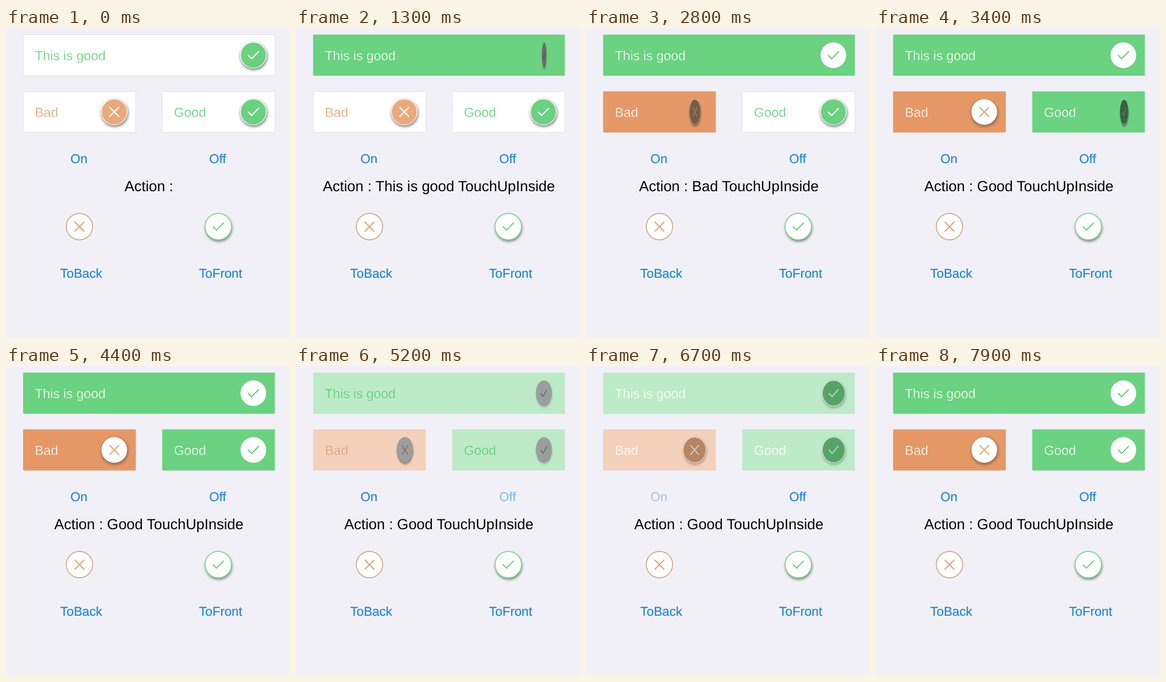
An HTML page for the animation above (8 s loop, 487x530 px).

```html
<!DOCTYPE html>
<html lang="en">
<head>
<meta charset="utf-8">
<title>Flip switches</title>
<style>
html, body { margin: 0; width: 100%; height: 100%; overflow: hidden; background: #f2f0f7; }
svg { display: block; width: 100%; height: 100%; }
text { font-family: "Liberation Sans", Arial, sans-serif; text-rendering: geometricPrecision; }
.mark { fill: none; stroke-width: 2.1; }
.title { font-size: 22.5px; stroke-width: .45px; }
.link { font-size: 21.9px; fill: #1c85d8; stroke: #1c85d8; stroke-width: .2px; text-anchor: middle; }
.action { font-size: 25.1px; fill: #050505; text-anchor: middle; }
</style>
</head>
<body>
<svg id="stage" viewBox="0 0 487 530">
  <defs>
    <filter id="blur" x="-30%" y="-30%" width="160%" height="160%">
      <feGaussianBlur stdDeviation="1.9"/>
    </filter>
  </defs>
</svg>
<script>
const LOOP = 8000, STEP = 100;
const HALF_FLIP = 250, FADE_ON = 180, FADE_OFF = 260;
const OFF_PRESS = 5000, OFF_TAP = 5055, ON_PRESS = 6400, ON_TAP = 6620;
const GREEN = [106, 210, 128], ORANGE = [229, 152, 102];
const WHITE = [255, 255, 255], BORDER = [227, 225, 231];
const CHECK = 'M-9.3 -.3L-3 6L9.5 -6.8', CROSS = 'M-8.3 -8.3L8.3 8.3M8.3 -8.3L-8.3 8.3';

const stage = document.getElementById('stage');
const clamp = v => Math.max(0, Math.min(1, v));
const rgb = c => `rgb(${c.map(Math.round).join()})`;
const mix = (a, b, p) => a.map((v, i) => v + (b[i] - v) * p);

function set(node, attrs) {
  for (const key in attrs) node.setAttribute(key, attrs[key]);
  return node;
}

function add(parent, tag, attrs, text = '') {
  const node = document.createElementNS('http://www.w3.org/2000/svg', tag);
  node.textContent = text;
  return parent.appendChild(set(node, attrs));
}

function makeSwitch({ label, x, y, width, color, ink, knobColor, mark, tap, onShadow }) {
  const box = add(stage, 'rect', { x: x + .5, y: y + .5, width: width - 1, height: 70, rx: 1 });
  const title = add(stage, 'text', { x: x + 20.5, y: y + 44, class: 'title' }, label);
  const cx = x + width - 37.3, cy = y + 35.5;
  const knob = add(stage, 'g', {});
  const shadow = add(knob, 'circle', { r: 23.5, cx: .8, cy: 2.3, fill: '#302c35', filter: 'url(#blur)' });
  const face = add(knob, 'circle', { r: 22, stroke: '#fff' });
  const glyph = add(knob, 'path', { d: mark, class: 'mark' });
  const shade = add(knob, 'circle', { r: 22.3 });
  const events = [[tap, true], [OFF_TAP, false], [ON_TAP, true]];

  return time => {
    const [start, on] = events.filter(e => e[0] <= time).pop() || [-LOOP, false];
    const age = time - start;
    const fade = clamp(age / (on ? FADE_ON : FADE_OFF));
    const level = on ? fade : 1 - fade;
    const back = mix(WHITE, color, level);
    const fill = rgb(back);
    const turn = Math.min(age / HALF_FLIP, 2);
    const tilt = turn < 1 ? turn : 2 - turn;
    const white = turn < 1 ? !on : on;
    const squash = Math.max(.02, Math.cos(tilt * Math.PI / 2));
    const depth = white ? onShadow : time < OFF_TAP ? .55 : .32;

    set(box, { fill, stroke: rgb(mix(BORDER, back, level * .6)) });
    set(title, { fill: on ? '#fff' : ink, stroke: fill });
    set(knob, { transform: `translate(${cx + 1.6 * tilt} ${cy}) scale(${squash} ${1 - .04 * tilt})` });
    set(shadow, { opacity: Math.max(depth, tilt * .3) });
    set(face, { fill: white ? '#fff' : knobColor, 'stroke-width': white ? 0 : 1.2 });
    set(glyph, { stroke: white ? knobColor : '#fff' });
    set(shade, { opacity: .66 * tilt });
  };
}

const green = { color: GREEN, ink: '#58cd74', knobColor: '#69d180', mark: CHECK, onShadow: 0 };
const switches = [
  { ...green, label: 'This is good', x: 29, y: 11, width: 432.5, tap: 1020 },
  { label: 'Bad', x: 29, y: 108, width: 194, tap: 2622, color: ORANGE, ink: '#dda078',
    knobColor: '#eba97b', mark: CROSS, onShadow: .4 },
  { ...green, label: 'Good', x: 267.5, y: 108, width: 194, tap: 3205 }
].map(spec => ({ label: spec.label, tap: spec.tap, draw: makeSwitch(spec) }));

const link = (label, x, y) => add(stage, 'text', { x, y, class: 'link' }, label);
const onLink = link('On', 125, 230.7);
const offLink = link('Off', 363, 230.7);
link('ToBack', 129, 427);
link('ToFront', 368, 427);
const action = add(stage, 'text', { x: 245, y: 279, class: 'action' });

function makeBadge(x, ring, ink, mark, raised) {
  const g = add(stage, 'g', { transform: `translate(${x} 339.6)` });
  if (raised) add(g, 'circle', { r: 23.2, cx: .8, cy: 2.7, fill: '#28512f', opacity: .6, filter: 'url(#blur)' });
  add(g, 'circle', { r: 22.6, fill: '#fff', stroke: ring, 'stroke-width': 1.4 });
  add(g, 'path', { d: mark, class: 'mark', stroke: ink });
}
makeBadge(126, '#c49f78', '#e5a57a', CROSS, false);
makeBadge(364, '#72d488', '#72d488', CHECK, true);

function linkAlpha(time, press, release) {
  if (time < press) return 1;
  return .2 + .8 * clamp((time - release) / 390);
}

function draw(time) {
  switches.forEach(s => s.draw(time));
  const last = switches.filter(s => s.tap <= time).pop();
  action.textContent = last ? `Action : ${last.label} TouchUpInside` : 'Action :';
  set(offLink, { opacity: linkAlpha(time, OFF_PRESS, OFF_TAP) });
  set(onLink, { opacity: linkAlpha(time, ON_PRESS, ON_TAP) });
}

const begin = performance.now();
function tick() {
  const time = (performance.now() - begin) % LOOP;
  draw(Math.floor(time / STEP) * STEP);
  requestAnimationFrame(tick);
}
tick();
</script>
</body>
</html>
```
